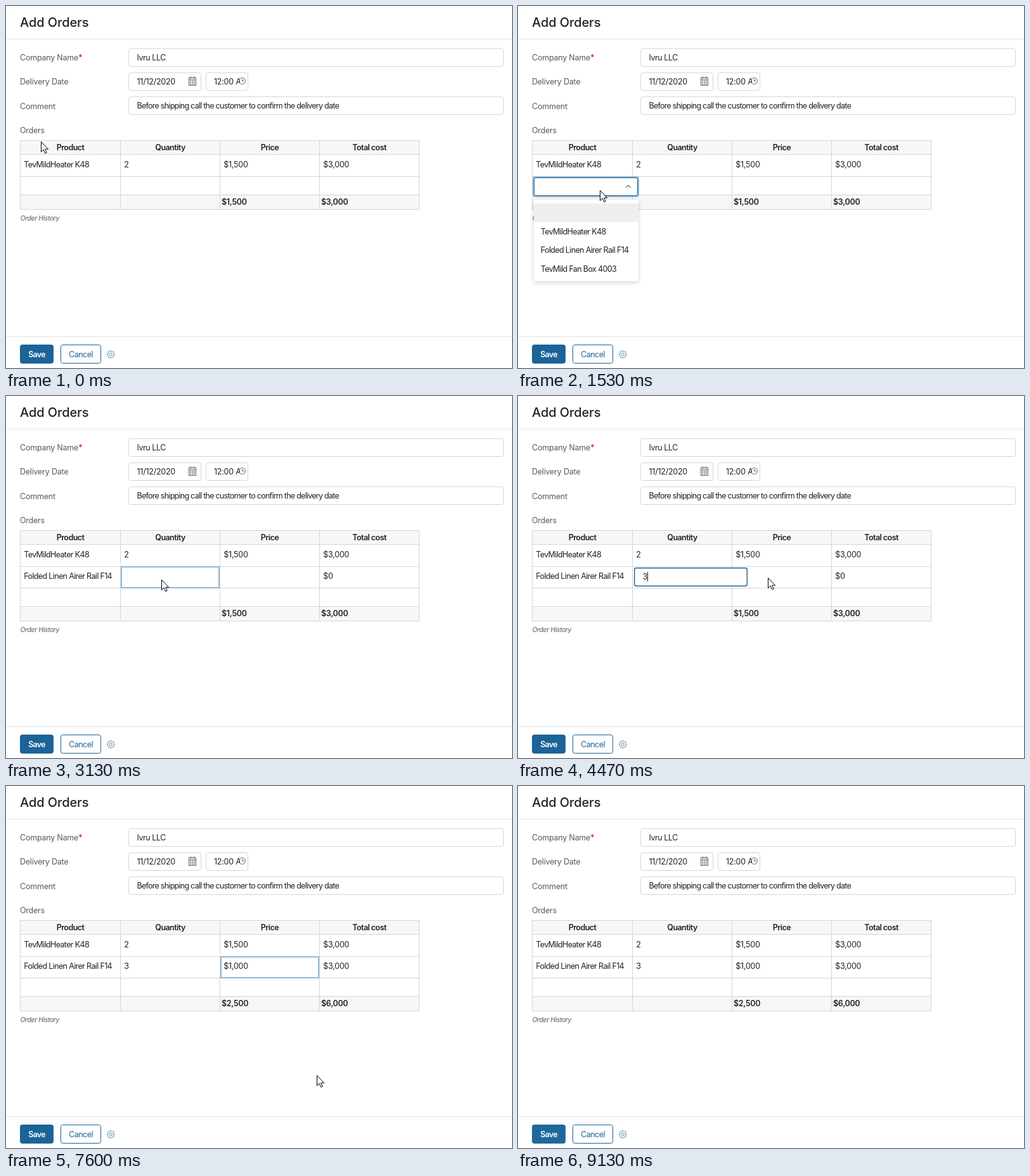
Recreate the animation shown at these times as an HTML page with a canvas. Size 798 px wide and 572 px high, loop 9390 ms.

```html
<!DOCTYPE html>
<html lang="en">
<head>
<meta charset="utf-8">
<title>Add Orders</title>
<style>
html, body { margin: 0; width: 100%; height: 100%; overflow: hidden; background: #fff; }
canvas { display: block; width: 798px; height: 572px; }
</style>
</head>
<body>
<canvas id="stage" width="798" height="572"></canvas>
<script>
const ctx = document.getElementById('stage').getContext('2d');
const LOOP = 9390;
const BLUE = '#1c6398', LINE = '#d5d5d5', INK = '#222', SOFT = '#595959';
const COLS = [22, 180, 337, 494, 651];
const ITEMS = ['', 'TevMildHeater K48', 'Folded Linen Airer Rail F14', 'TevMild Fan Box 4003'];
const LIST_TOP = 306, LIST_STEP = 29.4;

// Text styles: font, letter spacing, colour
const STYLES = {
  title: ['500 20px', -0.1, INK],
  label: ['400 12.5px', -0.22, SOFT],
  value: ['400 12.5px', -0.45, INK],
  note: ['400 12.5px', -0.74, INK],
  name: ['400 12.5px', -0.64, INK],
  digit: ['400 12.5px', -0.24, INK],
  head: ['600 12.5px', -0.55, INK],
  sum: ['600 12.5px', -0.3, INK],
  save: ['600 12.5px', -0.75, '#fff'],
  cancel: ['400 12.5px', -0.5, BLUE],
  history: ['italic 400 10.5px', -0.4, SOFT]
};

// Pointer: time, x, y, kind (a arrow, h hand, i text beam, n hidden)
const POINTER = [
  [0, 55, 214, 'a'], [70, 51, 232, 'a'], [130, 48, 258, 'a'], [200, 58, 281, 'a'],
  [270, 68, 291, 'a'], [400, 68, 291, 'a'], [530, 71, 291, 'a'], [800, 71, 291, 'a'],
  [930, 65, 295, 'a'], [1200, 65, 295, 'a'], [1270, 96, 296, 'a'], [1330, 129, 291, 'a'],
  [1600, 129, 291, 'a'], [1730, 132, 299, 'a'], [1870, 138, 325, 'h'], [2070, 146, 362, 'h'],
  [2200, 144, 376, 'h'], [2400, 144, 375, 'h'], [2470, 144, 375, 'h'], [2530, 150, 368, 'a'],
  [2800, 215, 310, 'a'], [3000, 245, 292, 'a'], [3070, 245, 290, 'a'], [3270, 245, 290, 'n'],
  [4200, 262, 290, 'i'], [4330, 330, 289, 'i'], [4400, 375, 289, 'a'], [4470, 394, 287, 'a'],
  [5070, 394, 287, 'n'], [5530, 396, 287, 'i'], [6870, 396, 287, 'i'], [6930, 394, 287, 'a'],
  [7270, 394, 287, 'a'], [7470, 450, 395, 'a'], [7600, 490, 457, 'a'], [7870, 490, 457, 'a'],
  [8200, 250, 512, 'a'], [8400, 90, 543, 'a'], [8470, 60, 546, 'h'], [8600, 38, 546, 'h'],
  [8800, 38, 546, 'h'], [9000, 58, 561, 'a'], [9070, 61, 569, 'a'], [9130, 61, 572, 'n']
];

function text(str, x, y, style, align = 'left') {
  const [font, gap, color] = STYLES[style];
  ctx.font = font + ' Inter, sans-serif';
  ctx.letterSpacing = gap + 'px';
  ctx.fillStyle = color;
  ctx.textAlign = align;
  ctx.fillText(str, x, y);
  return ctx.measureText(str).width;
}

function rect(x, y, w, h, color) {
  ctx.fillStyle = color;
  ctx.fillRect(x, y, w, h);
}

function box(x0, y0, x1, y1, stroke, fill = '#fff', width = 1) {
  ctx.beginPath();
  ctx.roundRect(x0 + width / 2, y0 + width / 2, x1 - x0 - width, y1 - y0 - width, 3);
  ctx.fillStyle = fill;
  ctx.fill();
  ctx.strokeStyle = stroke;
  ctx.lineWidth = width;
  ctx.stroke();
}

function poly(points, close) {
  ctx.beginPath();
  points.forEach(([x, y], i) => i ? ctx.lineTo(x, y) : ctx.moveTo(x, y));
  if (close) ctx.closePath();
}

function calendar() {
  const color = '#666';
  ctx.strokeStyle = color;
  ctx.lineWidth = 1;
  ctx.strokeRect(288.5, 113.5, 11, 12);
  rect(288, 116, 12, 1, color);
  rect(291, 111, 1, 4, color);
  rect(296, 111, 1, 4, color);
  for (let r = 0; r < 3; r++)
    for (let c = 0; c < 3; c++) rect(290 + c * 3, 118 + r * 2.4, 2, 1.3, color);
}

function clock() {
  ctx.beginPath();
  ctx.arc(372.5, 118.5, 5, 0, 7);
  ctx.strokeStyle = '#666';
  ctx.lineWidth = 1;
  ctx.stroke();
  poly([[372.5, 115.5], [372.5, 118.5], [375.5, 118.5]]);
  ctx.stroke();
}

function gear() {
  ctx.beginPath();
  for (let i = 0; i <= 72; i++) {
    const a = i / 72 * Math.PI * 2;
    const r = 5.3 + 0.75 * Math.tanh(3 * Math.cos(a * 8));
    ctx.lineTo(165.3 + r * Math.cos(a), 550.5 + r * Math.sin(a));
  }
  ctx.closePath();
  ctx.strokeStyle = '#3f7ca8';
  ctx.lineWidth = 0.9;
  ctx.stroke();
  ctx.beginPath();
  ctx.arc(165.3, 550.5, 2.1, 0, 7);
  ctx.stroke();
}

function form() {
  text('Add Orders', 22, 33, 'title');
  rect(0, 52, 798, 1, '#e5e5e5');
  const w = text('Company Name', 22, 86, 'label');
  ctx.fillStyle = '#d0021b';
  ctx.fillText('*', 22 + w, 86);
  text('Delivery Date', 22, 124, 'label');
  text('Comment', 22, 163, 'label');
  text('Orders', 22, 201, 'label');
  box(193, 67, 785, 96, LINE);
  box(193, 105, 308, 134, LINE);
  box(315, 105, 382, 134, LINE);
  box(193, 143, 785, 172, LINE);
  text('Ivru LLC', 206.5, 86, 'value');
  text('11/12/2020', 206.5, 124, 'digit');
  text('Before shipping call the customer to confirm the delivery date', 206.5, 162, 'note');
  ctx.save();
  ctx.beginPath();
  ctx.rect(315, 105, 54, 29);
  ctx.clip();
  text('12:00 AM', 328, 124, 'digit');
  ctx.restore();
  calendar();
  clock();
}

function table(t) {
  const added = t >= 2600, priced = t >= 6930;
  const rows = added ? [212, 234, 269, 303, 332, 355] : [212, 234, 269, 298, 321];
  const end = rows[rows.length - 1], foot = rows[rows.length - 2];
  rect(22, 212, 630, 22, '#f7f7f7');
  rect(22, foot, 630, end - foot, '#f7f7f7');
  rows.forEach(y => rect(22, y, 630, 1, LINE));
  COLS.forEach(x => rect(x, 212, 1, end - 211, LINE));
  ['Product', 'Quantity', 'Price', 'Total cost'].forEach((s, i) =>
    text(s, (COLS[i] + COLS[i + 1]) / 2 + 0.5, 228, 'head', 'center'));

  const row = (cells, y) => cells.forEach((s, i) =>
    text(s, COLS[i] + 6.3, y, i ? 'digit' : 'name'));
  row([ITEMS[1], '2', '$1,500', '$3,000'], 255);
  if (added) row([ITEMS[2], t >= 4000 ? '3' : '', priced ? '$1,000' : '', priced ? '$3,000' : '$0'], 289);
  text(priced ? '$2,500' : '$1,500', 340, end - 7, 'sum');
  text(priced ? '$6,000' : '$3,000', 497, end - 7, 'sum');
  text('Order History', 22.5, end + 18, 'history');
}

function cellMark(col, bottom) {
  ctx.strokeStyle = '#8fb9dd';
  ctx.lineWidth = 2;
  ctx.strokeRect(COLS[col] + 2, 270, COLS[col + 1] - COLS[col] - 3, bottom - 270);
}

function dropdown(t, pointer) {
  const dy = t < 1530 ? 9 : Math.max(0, 6 - (t - 1530) / 20);
  ctx.save();
  ctx.globalAlpha = t < 1530 ? 0.6 : t >= 2470 ? 0.45 : 1;
  ctx.translate(0, dy);
  ctx.shadowColor = 'rgba(0,0,0,0.18)';
  ctx.shadowBlur = 7;
  ctx.shadowOffsetY = 2;
  rect(25, 300, 165, 129, '#fff');
  ctx.shadowColor = 'transparent';
  const hover = pointer.kind === 'h' ? Math.floor((pointer.y - LIST_TOP) / LIST_STEP) : 0;
  ITEMS.forEach((s, i) => {
    const y = LIST_TOP + i * LIST_STEP, top = Math.floor(y);
    if (!i || i === hover) rect(25, top, 165, Math.floor(y + LIST_STEP) - top, '#efefef');
    text(s, 35.8, Math.round(y + 19.4), 'name');
  });
  ctx.restore();
}

function picker(t, pointer) {
  const open = t >= 1470 && t < 2530, focused = t < 2330;
  if (open) dropdown(t, pointer);
  if (focused) box(23, 269, 191, 302, '#8eb5d3', '#8eb5d3');
  box(25, 271, 189, 300, focused ? BLUE : '#c9c9c9');
  if (t >= 2470) text(ITEMS[2], 35.8, 290, 'name');
  const up = t >= 1470 && t < 2470 ? 1 : -1;
  poly([[170.5, 285 + 2 * up], [174, 285 - 1.8 * up], [177.5, 285 + 2 * up]]);
  ctx.strokeStyle = '#444';
  ctx.lineWidth = 1.1;
  ctx.stroke();
}

function editor(x0, x1, value, textX, caret) {
  box(x0, 271, x1, 301, BLUE, '#fff', 1.4);
  const w = text(value, textX, 290, 'digit');
  if (caret) rect(Math.round(textX + w), 278, 1, 15, '#111');
}

function orderEdit(t, pointer) {
  if (t >= 670 && t < 870) cellMark(0, 298);
  if (t >= 870 && t < 2600) picker(t, pointer);
  if (t >= 2600 && t < 3130) cellMark(0, 303);
  if (t >= 3130 && t < 4000) cellMark(1, 303);
  if (t >= 4000 && t < 4600) editor(183, 362, '3', 196.5, true);
  if ((t >= 4600 && t < 5470) || (t >= 6930 && t < 7730)) cellMark(2, 303);
  if (t >= 5470 && t < 6930) {
    const typed = 1 + [5730, 5930, 6130].filter(k => t >= k).length;
    editor(308, 492, '1000'.slice(0, typed), 326.5, t < 6670);
    text('$', 312.5, 290, 'digit');
  }
}

function footer(t) {
  rect(0, 522, 798, 1, '#e5e5e5');
  const fill = t >= 8470 ? '#20689c' : BLUE;
  box(22, 535, 75, 565, fill, fill);
  text('Save', 48.5, 555, 'save', 'center');
  box(86, 535, 150, 565, BLUE);
  text('Cancel', 118, 555, 'cancel', 'center');
  gear();
}

function pointerAt(t) {
  let i = POINTER.length - 1;
  while (POINTER[i][0] > t) i--;
  const [t0, x0, y0, kind] = POINTER[i];
  const next = POINTER[i + 1];
  if (!next || kind === 'n' || next[3] === 'n') return { x: x0, y: y0, kind };
  const k = (t - t0) / (next[0] - t0);
  return {
    x: Math.round(x0 + (next[1] - x0) * k),
    y: Math.round(y0 + (next[2] - y0) * k),
    kind
  };
}

function drawPointer({ x, y, kind }) {
  if (kind === 'n') return;
  ctx.save();
  ctx.translate(x, y);
  ctx.lineJoin = 'round';
  ctx.lineWidth = 1;
  ctx.strokeStyle = '#000';
  ctx.fillStyle = '#fff';
  if (kind === 'a') {
    poly([[0.5, 0.5], [0.5, 16.5], [4.2, 13], [6.8, 18.8], [9.2, 17.7], [6.7, 12.2], [11.6, 12.2]], true);
    ctx.fill();
    ctx.stroke();
  } else if (kind === 'h') {
    ctx.beginPath();
    ctx.moveTo(-1.5, 13.5);
    ctx.lineTo(-1.5, 2);
    ctx.quadraticCurveTo(0, -0.6, 1.5, 2);
    ctx.lineTo(1.5, 7.5);
    ctx.quadraticCurveTo(3.5, 6.3, 4.3, 8.3);
    ctx.quadraticCurveTo(6, 7.2, 6.8, 9.2);
    ctx.quadraticCurveTo(9, 8.6, 9, 11.5);
    ctx.lineTo(9, 16);
    ctx.quadraticCurveTo(8.5, 19, 6.5, 20.5);
    ctx.lineTo(6.5, 23.3);
    ctx.lineTo(-1.5, 23.3);
    ctx.lineTo(-1.5, 21);
    ctx.lineTo(-5.5, 14.5);
    ctx.quadraticCurveTo(-6.2, 11.6, -3.5, 12.1);
    ctx.closePath();
    ctx.fill();
    ctx.stroke();
    [1.5, 4.3, 6.8].forEach((px, i) => {
      poly([[px, 7.5 + i * 0.8], [px, 12]]);
      ctx.stroke();
    });
  } else {
    rect(0, -6, 1, 13, '#000');
    [-7, 7].forEach(py => {
      rect(-3, py, 3, 1, '#000');
      rect(1, py, 3, 1, '#000');
    });
  }
  ctx.restore();
}

function draw(now) {
  // The picture advances fifteen times a second
  const step = Math.floor((now % LOOP + 4) * 3 / 200);
  const t = Math.round(step * 20 / 3) * 10;
  const pointer = pointerAt(t);
  rect(0, 0, 798, 572, '#fff');
  form();
  table(t);
  orderEdit(t, pointer);
  footer(t);
  drawPointer(pointer);
}

const start = performance.now();
function tick() {
  draw(performance.now() - start);
  requestAnimationFrame(tick);
}
tick();
</script>
</body>
</html>
```
